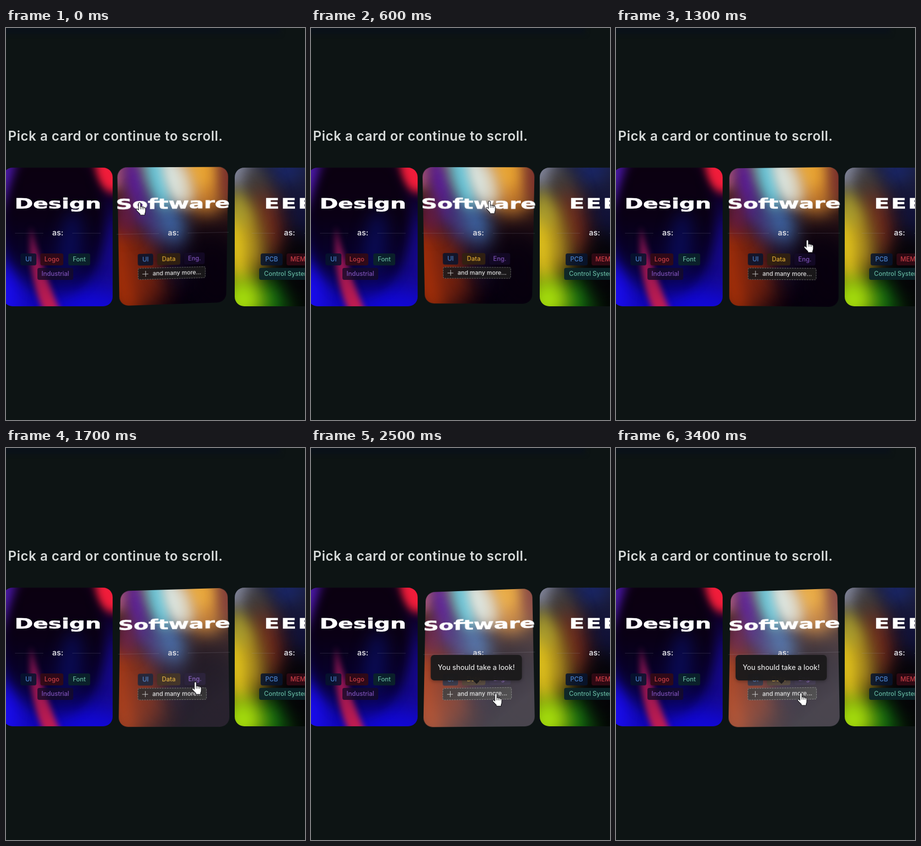
Recreate the animation shown at these times as an HTML page with a canvas. Size 600 by 786 pixels, loop 3.5 s.

```html
<!DOCTYPE html>
<html lang="en">
<head>
<meta charset="utf-8">
<title>Pick a card</title>
<style>
  html, body { margin: 0; width: 100%; height: 100%; overflow: hidden; background: #0d1414; }
  body { position: relative; font-family: Inter, "Open Sans", sans-serif; }
  #stage { position: absolute; left: 0; top: 0; width: 600px; height: 786px; overflow: hidden; }
  #stage * { box-sizing: border-box; white-space: nowrap; }
  #haze { position: absolute; left: -40px; top: -16px; width: 590px; height: 28px; background: #0a1119; filter: blur(5px); }
  h1 { position: absolute; left: 4px; top: 201px; margin: 0; font-size: 26.5px; line-height: 30px; font-weight: 600; letter-spacing: .64px; color: #d6dad9; }
  .card { position: absolute; top: 280px; width: 220px; height: 278px; }
  .face { position: absolute; inset: 0; border-radius: 19px; overflow: hidden; }
  .face canvas { display: block; }
  .glare { position: absolute; inset: 0; border-radius: 19px; opacity: 0; background: linear-gradient(142deg, rgba(255,255,255,.05) 15%, rgba(255,255,255,.27) 85%); }
  .name { --wide: 1.63; position: absolute; left: 50%; top: 54px; font: 700 27.5px/36px "DejaVu Sans", sans-serif; color: #fff; -webkit-text-stroke: .6px #fff; transform: translateX(-50%) scaleX(var(--wide)); }
  .as { position: absolute; left: 0; width: 100%; top: 120px; text-align: center; font-size: 15.5px; line-height: 22px; font-weight: 600; color: #dcdce2; }
  .rule { position: absolute; top: 131px; height: 1px; background: rgba(150,150,170,.22); }
  .chip { position: absolute; height: 24px; line-height: 24px; border-radius: 4px; text-align: center; font-size: 12.5px; font-weight: 500; }
  .more { border: 1px dashed #6c6c6c; line-height: 22px; font-size: 12px; padding-left: 21px; }
  .more::before, .more::after { content: ""; position: absolute; background: #c8c8c8; }
  .more::before { left: 8px; top: 10.5px; width: 12px; height: 1px; }
  .more::after { left: 13.5px; top: 5px; width: 1px; height: 12px; }
  #tip { position: absolute; left: 241px; top: 415px; width: 183px; height: 51px; line-height: 49px; border-radius: 7px; background: rgba(27,26,27,.97); color: #e0e0e0; font-size: 14px; font-weight: 500; text-align: center; box-shadow: 0 2px 6px rgba(0,0,0,.3); }
  #tip::after { content: ""; position: absolute; left: 85px; top: 51px; border: 7px solid transparent; border-top-color: #1b1a1b; border-bottom: 0; }
  #hand { position: absolute; left: -10px; top: -1px; overflow: visible; }
</style>
</head>
<body>
<div id="stage">
  <div id="haze"></div>
  <h1>Pick a card or continue to scroll.</h1>
  <div id="cards"></div>
  <div id="tip">You should take a look!</div>
  <svg id="hand" width="22" height="29" viewBox="-1 -1 22 29">
    <path d="M5 3a2 2 0 0 1 4 0v6.4q2-1 3.3.6 2-.9 3.2.8 3-.6 3.4 2.4v5.4q0 2.4-1.3 4.4V26H8v-2Q4.5 20.500 .9 16.600q-1-2 .7-2.800 1.500-.4 3.400 2z" fill="#fff" stroke="#15151a" stroke-width="1.1" stroke-linejoin="round"/>
    <path d="M9 9.500v5M12.300 10.200v4.300M15.500 11v3.600" fill="none" stroke="#222" stroke-width="1"/>
  </svg>
</div>
<script>
const W = 220, H = 278, LOOP = 3500, STEP = 100;

// Each blob: colour, blur, x, y, rx, ry, rotation
function paint(ctx, blobs) {
  for (const [color, blur, x, y, rx, ry, rot = 0] of blobs) {
    ctx.filter = `blur(${blur}px)`;
    ctx.fillStyle = color;
    ctx.beginPath();
    ctx.ellipse(x, y, rx, ry, rot, 0, Math.PI * 2);
    ctx.fill();
  }
}

function ramp(ctx, stops) {
  const g = ctx.createLinearGradient(0, 0, 0, H);
  stops.forEach((c, i) => g.addColorStop(i / (stops.length - 1), c));
  return g;
}

function fillBase(ctx, stops) {
  ctx.fillStyle = ramp(ctx, stops);
  ctx.fillRect(0, 0, W, H);
}

function artDesign(ctx) {
  fillBase(ctx, ['#14001c', '#0c0330', '#0a0458', '#1006b4']);
  paint(ctx, [
    ['#1a0cf4', 24, -4, 255, 42, 70],
    ['#4c18ac', 14, 0, 12, 26, 70],
    ['#1a0a9c', 26, 226, 190, 28, 100],
    ['#1208dc', 24, 175, 285, 75, 36],
    ['#f01c3a', 9, 222, 2, 38, 48],
    [ramp(ctx, ['#0b0010', '#0a0014', 'rgba(7,1,36,.8)', 'rgba(6,0,50,0)']), 10, 103, 112, 100, 155],
    ['rgba(12,20,130,.55)', 16, 135, 150, 20, 65, .12]
  ]);
  ctx.filter = 'blur(6px)';
  ctx.fillStyle = ramp(ctx, ['#300838', '#4a0c40', '#8c1450', '#c01c50']);
  ctx.beginPath();
  ctx.moveTo(56, 118);
  ctx.quadraticCurveTo(46, 205, 82, 290);
  ctx.lineTo(116, 290);
  ctx.quadraticCurveTo(78, 205, 56, 118);
  ctx.fill();
}

function artSoftware(ctx) {
  fillBase(ctx, ['#7a4430', '#2c1416', '#0c0512', '#06000e']);
  paint(ctx, [
    ['#a83008', 22, 8, 210, 44, 105, -.12],
    ['#7c2410', 26, 55, 200, 32, 85, -.2],
    ['#a05070', 9, 0, 8, 15, 36],
    ['#5a1c9c', 12, 36, 40, 18, 70, -.2],
    ['#6a1c48', 15, 16, 95, 18, 40],
    ['#46307c', 18, 66, 100, 22, 52, -.3],
    ['#c47a2c', 18, 165, 28, 44, 70, -.35],
    ['#e8a432', 14, 162, 4, 28, 42, -.3],
    ['#7c2c2c', 14, 222, 15, 16, 55],
    ['#3f68a8', 18, 105, 110, 26, 52, -.32],
    ['#62c0d4', 12, 80, 18, 25, 66, -.25],
    ['#dcc8a8', 14, 130, 30, 18, 50, -.3],
    ['#e0ece8', 13, 110, 22, 17, 58, -.3],
    ['rgba(24,18,60,.7)', 22, 112, 190, 24, 45, -.3],
    ['rgba(8,0,14,.85)', 24, 195, 205, 50, 85, -.2]
  ]);
}

function artElectronics(ctx) {
  fillBase(ctx, ['#1c2040', '#161020', '#060408', '#030604']);
  paint(ctx, [
    ['#8c90a6', 18, 2, 4, 32, 46],
    ['#1a2870', 18, 104, 6, 30, 24],
    ['#464238', 18, 48, 50, 24, 55, -.25],
    ['#74281c', 20, 68, 115, 26, 72, -.25],
    ['#0f1858', 22, 138, 100, 14, 60, -.2],
    ['#127010', 20, 75, 265, 34, 45],
    ['#8c6c20', 18, 36, 140, 24, 75, -.2],
    ['#e4c41c', 18, 2, 155, 32, 90, -.12],
    ['#a8a032', 15, 8, 80, 16, 40, -.2],
    ['#a4dc0c', 18, 16, 265, 44, 46],
    ['rgba(5,4,8,.9)', 20, 128, 200, 36, 70]
  ]);
}

// Chips: text, x, y, width, background, colour
const BLUE = ['rgba(6,20,46,.85)', '#4a80cc'];
const RED = ['rgba(52,10,20,.9)', '#c43c44'];
const TEAL = ['rgba(10,36,42,.9)', '#62b29c'];
const PURPLE = ['rgba(20,10,40,.8)', '#7c50b6'];
const DECK = [
  { name: 'Design', left: -6, inset: 24, art: artDesign, chips: [
    ['UI', 35, 172, 32, ...BLUE], ['Logo', 75, 172, 46, ...RED],
    ['Font', 131, 172, 44, ...TEAL], ['Industrial', 69, 201, 72, ...PURPLE]] },
  { name: 'Software', left: 226, inset: -3, art: artSoftware, chips: [
    ['UI', 38, 172, 31, ...BLUE], ['Data', 77, 172, 47, 'rgba(50,34,16,.9)', '#dca830'],
    ['Eng.', 132, 172, 42, ...PURPLE], ['and many more...', 38, 201, 138, 'rgba(28,27,28,.88)', '#e2e2e2', 'more']] },
  { name: 'EEE', left: 459, inset: 34, track: 2, art: artElectronics, chips: [
    ['PCB', 52, 172, 44, ...BLUE], ['MEMS', 104, 172, 54, ...RED],
    ['Control Systems', 49, 201, 118, ...TEAL]] }
];

function add(parent, cls, text = '', style = {}, tag = 'div') {
  const el = document.createElement(tag);
  el.className = cls;
  el.textContent = text;
  Object.assign(el.style, style);
  return parent.appendChild(el);
}

function build(spec) {
  const card = add(document.getElementById('cards'), 'card', '', { left: spec.left + 'px' });
  const canvas = add(add(card, 'face'), '', '', {}, 'canvas');
  canvas.width = W;
  canvas.height = H;
  spec.art(canvas.getContext('2d'));
  add(card, 'name', spec.name, { letterSpacing: (spec.track || 0) + 'px' });
  add(card, 'as', 'as:');
  const rule = { left: spec.inset + 'px', width: 81 - spec.inset + 'px' };
  add(card, 'rule', '', rule);
  add(card, 'rule', '', { right: rule.left, width: rule.width });
  for (const [text, x, y, w, background, color, cls = ''] of spec.chips) {
    add(card, 'chip ' + cls, text, { left: x + 'px', top: y + 'px', width: w + 'px', background, color });
  }
  return { card, glare: add(card, 'glare') };
}

const [, hover] = DECK.map(build);
const hand = document.getElementById('hand');
const tip = document.getElementById('tip');

// time, pointer x, pointer y, tilt x, tilt y, glare
const KEYS = [
  [0, 270, 349, -9, -7, 0],
  [600, 360, 346, -10.5, .5, 0],
  [1300, 386, 424, .5, 5, 0],
  [1700, 382, 468, 8, 6.5, .5],
  [2200, 374, 490, 10.5, 6.5, 1],
  [2800, 373, 490, 10.5, 6.8, 1],
  [LOOP, 373, 490, 10.5, 6.8, 1]
];
const clamp = v => Math.min(1, Math.max(0, v));

// Slope through the neighbours of key i for column n
function slope(i, n) {
  const a = KEYS[Math.max(0, i - 1)], b = KEYS[Math.min(KEYS.length - 1, i + 1)];
  return (b[n] - a[n]) / (b[0] - a[0]);
}

// Smooth curve that passes the keys without stopping
function pose(t) {
  const i = KEYS.findIndex((k, n) => n && t < k[0]);
  const a = KEYS[i - 1], b = KEYS[i], span = b[0] - a[0];
  const u = (t - a[0]) / span, v = 1 - u;
  return a.map((p, n) =>
    p * v * v * (1 + 2 * u) + b[n] * u * u * (3 - 2 * u) +
    span * u * v * (slope(i - 1, n) * v - slope(i, n) * u));
}

function draw(now) {
  const t = Math.floor((now % LOOP) / STEP) * STEP;
  const [, x, y, tiltX, tiltY, shine] = pose(t);
  hover.card.style.transform = `perspective(1100px) rotateX(${tiltX}deg) rotateY(${-tiltY}deg)`;
  hover.glare.style.opacity = clamp(shine);
  hand.style.transform = `translate(${x}px, ${y}px)`;
  tip.style.opacity = clamp((t - 1900) / 250);
  tip.style.transform = `translateX(${-clamp((t - 2200) / 400)}px)`;
}

const start = performance.now();
function tick() {
  draw(performance.now() - start);
  requestAnimationFrame(tick);
}
tick();
</script>
</body>
</html>
```
